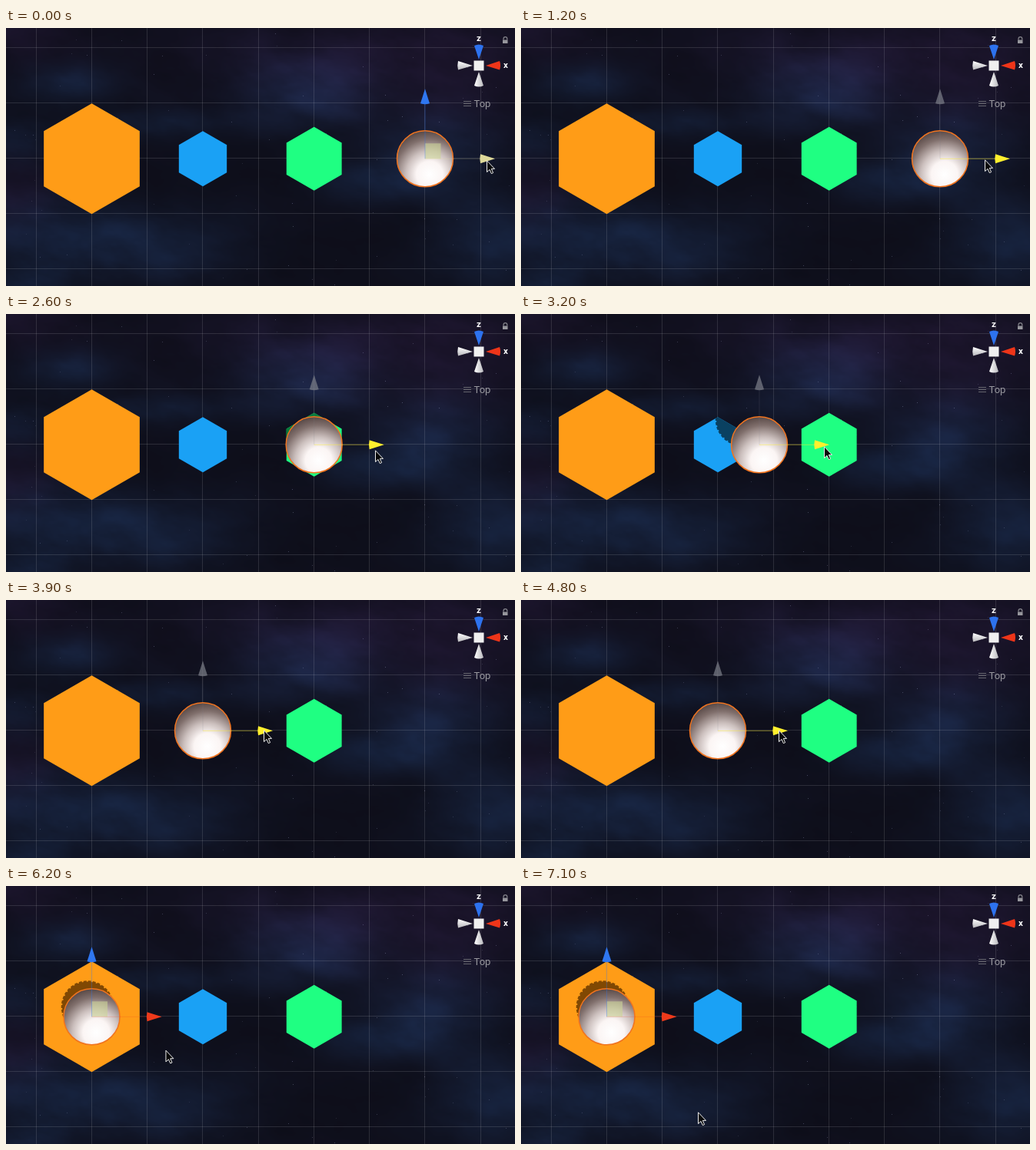
An HTML page with a canvas that plays this animation: 662 by 336 pixels, repeating every 7200 ms.

```html
<!DOCTYPE html>
<html lang="en">
<head>
<meta charset="utf-8">
<title>Hex snapping</title>
<style>
  html, body { margin: 0; width: 100%; height: 100%; overflow: hidden; background: #0e0f1c; }
  canvas, svg { position: absolute; left: 0; top: 0; width: 662px; height: 336px; display: block; }
  text { font-family: Roboto, "Liberation Sans", sans-serif; }
</style>
</head>
<body>
<canvas id="sky" width="662" height="336"></canvas>
<svg viewBox="0 0 662 336">
  <defs>
    <radialGradient id="lit" cx=".58" cy=".78" r=".84">
      <stop offset="0" stop-color="#fff"/>
      <stop offset=".28" stop-color="#fbf5f4"/>
      <stop offset=".5" stop-color="#cbbfbd"/>
      <stop offset=".75" stop-color="#806f6c"/>
      <stop offset="1" stop-color="#4a3b39"/>
    </radialGradient>
    <linearGradient id="coneX" x2="0" y2="1">
      <stop offset="0" stop-color="#fff"/><stop offset="1" stop-color="#b9b9bd"/>
    </linearGradient>
    <linearGradient id="coneY">
      <stop offset="0" stop-color="#fff"/><stop offset="1" stop-color="#b9b9bd"/>
    </linearGradient>
  </defs>
  <path id="grid" stroke="#fff" stroke-opacity=".12" fill="none"/>
  <g id="hexes"></g>
  <g id="ball">
    <circle r="36.500" fill="url(#lit)" stroke="#f1741f" stroke-width="1.500"/>
    <rect id="plane" y="-20" width="20.500" height="20" fill="#cbd496" fill-opacity=".6"/>
    <path id="zLine" d="M0 0V-72"/>
    <path id="xLine" d="M0 0H73"/>
    <path id="zTip" d="M-6 -72L0 -91L6 -72Q0 -70 -6 -72Z"/>
    <path id="xTip" d="M72 -6L91 0L72 6Q70.500 0 72 -6Z"/>
  </g>
  <g id="compass">
    <path d="M609 23Q615 20 621 23L615 41Z" fill="#2d72ee"/>
    <path d="M642 43Q644 48.500 642 54.500L624 49Z" fill="#ee3519"/>
    <path d="M588 43Q586.500 49 588 54.500L607 49Z" fill="url(#coneX)"/>
    <path d="M609 75Q615 78 621 75L615 57Z" fill="url(#coneY)"/>
    <rect x="608.500" y="42.500" width="13" height="13" fill="#f0f0f0"/>
    <g fill="#fff" font-size="11.500" font-weight="700" text-anchor="middle">
      <text x="615" y="17">z</text>
      <text x="650" y="52">x</text>
    </g>
    <path d="M647 15.500V14A2.400 2.400 0 0 1 651.800 14V15.500" fill="none" stroke="#85858c" stroke-width="1.200"/>
    <rect x="646" y="15.500" width="6.500" height="4.500" fill="#96969c"/>
    <path d="M595 95.500H605M595 98.500H605M595 101.500H605" stroke="#66666e"/>
    <text x="608.500" y="103" font-size="13" fill="#98989e">Top</text>
  </g>
  <path id="cursor" d="M.5 .8V15.600L4 12.400L6.300 17.600L8.600 16.600L6.300 11.400H10.500Z"
        fill="#080808" stroke="#eee"/>
</svg>
<script>
const LOOP = 7200, STEP = 100, MID = 170.5;
const GRAB = 84, SNAP = 28, START = 545;
const DRAG_FROM = 800, DRAG_TO = 5900;
const $ = id => document.getElementById(id);

// centre x, radius, fill, shadow colour, shadow offset
const cells = [
  { x: 111.5, r: 72, fill: '#ff9c17', dark: '#804803', dx: -5.5, dy: -13 },
  { x: 256, r: 36, fill: '#1aa1f5', dark: '#0a4161', dx: -23, dy: -33 },
  { x: 400.7, r: 41.5, fill: '#1fff82', dark: '#087a3c', dx: -23, dy: -33 }
];

// time, x, y
const path = [
  [0, 625, 172], [900, 625, 172], [1200, 603, 171], [1800, 480, 177],
  [2600, 480, 177], [3200, 394, 172], [3800, 335, 169], [4800, 335, 169],
  [5400, 197, 176], [5900, 197, 176], [6700, 230, 294], [LOOP, 230, 294]
];

function drawSky() {
  const w = 662, h = 336, ctx = $('sky').getContext('2d');
  const img = ctx.createImageData(w, h);
  // x, y, half width, half height, tint
  const BLUE = [10, 24, 42], VIOLET = [17, 8, 22];
  const clouds = [
    [80, 75, 60, 26, BLUE], [200, 124, 85, 18, BLUE], [15, 145, 60, 30, BLUE],
    [55, 265, 90, 40, BLUE], [190, 285, 120, 50, BLUE], [30, 330, 70, 35, BLUE],
    [385, 85, 95, 50, BLUE], [475, 200, 75, 25, BLUE], [560, 160, 90, 50, BLUE],
    [630, 285, 80, 65, BLUE],
    [5, 210, 60, 45, VIOLET], [20, 10, 80, 35, VIOLET],
    [590, 50, 140, 85, VIOLET], [400, 35, 170, 55, VIOLET]
  ];
  const hash = (x, y) => {
    const v = Math.sin(x * 127.1 + y * 311.7) * 43758.5453;
    return v - Math.floor(v);
  };
  const noise = (x, y) => {
    const i = Math.floor(x), j = Math.floor(y);
    let u = x - i, v = y - j;
    u *= u * (3 - 2 * u);
    v *= v * (3 - 2 * v);
    const a = hash(i, j), b = hash(i + 1, j), c = hash(i, j + 1), d = hash(i + 1, j + 1);
    return a + (b - a) * u + (c - a + (a - b - c + d) * u) * v;
  };
  const fbm = (x, y) => {
    let sum = 0;
    for (let o = 0, amp = .5, f = 1; o < 5; o++, amp /= 2, f *= 2) sum += amp * noise(x * f + o * 9, y * f);
    return sum;
  };
  for (let y = 0, p = 0; y < h; y++) {
    for (let x = 0; x < w; x++, p += 4) {
      const n = fbm((x + y * .3) / 75, (y - x * .25) / 38 + 20);
      const c = [12 + n * 4, 12 + n * 5, 22 + n * 9];
      const k = .35 + n * .9;
      for (const [cx, cy, rx, ry, tint] of clouds) {
        const d = ((x - cx) / rx) ** 2 + ((y - cy) / ry) ** 2;
        if (d > 6) continue;
        const g = Math.exp(-d) * k * .8;
        for (let i = 0; i < 3; i++) c[i] += tint[i] * g;
      }
      img.data.set([...c, 255], p);
    }
  }
  ctx.putImageData(img, 0, 0);
  for (let i = 1; i <= 70; i++) {
    ctx.fillStyle = `rgba(170,175,215,${.1 + .25 * hash(i, 7)})`;
    ctx.fillRect(Math.floor(hash(i, 1) * w), Math.floor(hash(i, 4) * h), 1, 1);
  }
}

function buildScene() {
  let lines = '';
  for (let i = 0; i < 9; i++) lines += `M${Math.floor(39 + i * 72.25) + .5} 0V336`;
  for (let i = 0; i < 5; i++) lines += `M0 ${Math.floor(25 + i * 72.2) + .5}H662`;
  $('grid').setAttribute('d', lines);

  $('hexes').innerHTML = cells.map(({ x, r, fill, dark }, i) => {
    const pts = Array.from({ length: 6 }, (_, k) => {
      const a = (k + .5) * Math.PI / 3;
      return [x + r * Math.cos(a), MID - .3 + r * Math.sin(a)].map(v => v.toFixed(2)).join();
    }).join(' ');
    return `<clipPath id="clip${i}"><polygon points="${pts}"/></clipPath>
      <polygon points="${pts}" fill="${fill}"/>
      <g clip-path="url(#clip${i})"><circle id="shade${i}" r="33" fill="${dark}"
        stroke="${dark}" stroke-width="2.500" stroke-dasharray="4 2"/></g>`;
  }).join('');
}

function cursorAt(t) {
  const i = path.findIndex(k => k[0] > t);
  const [t0, x0, y0] = path[i - 1], [t1, x1, y1] = path[i];
  const u = (t - t0) / (t1 - t0), e = u * u * (3 - 2 * u);
  return [x0 + (x1 - x0) * e, y0 + (y1 - y0) * e];
}

function ballAt(t, cx) {
  if (t < DRAG_FROM) return START;
  if (t >= DRAG_TO) return cells[0].x;
  const free = cx - GRAB;
  const stop = [START, ...cells.map(c => c.x)].find(x => Math.abs(x - free) < SNAP);
  return stop ?? free;
}

function move(id, x, y) {
  $(id).setAttribute('transform', `translate(${x} ${y})`);
}

function render(t) {
  const [cx, cy] = cursorAt(t), x = ballAt(t, cx);
  const drag = t >= DRAG_FROM && t < DRAG_TO;
  const xColor = drag ? '#fff02e' : t < DRAG_FROM ? '#ded99a' : '#ee3a1b';
  const zColor = drag ? 'rgba(125,128,138,.7)' : '#2f77f0';
  move('cursor', cx, cy);
  move('ball', x, MID - .2);
  $('plane').style.display = drag ? 'none' : '';
  $('xTip').style.fill = $('xLine').style.stroke = xColor;
  $('zTip').style.fill = $('zLine').style.stroke = zColor;
  $('xLine').style.strokeOpacity = drag ? .45 : .2;
  $('zLine').style.strokeOpacity = drag ? .25 : .35;
  cells.forEach((c, i) => move('shade' + i, x + c.dx, MID + c.dy));
}

drawSky();
buildScene();
const began = performance.now();
(function tick() {
  const t = (performance.now() - began) % LOOP;
  render(Math.floor(t / STEP) * STEP);
  requestAnimationFrame(tick);
})();
</script>
</body>
</html>
```
